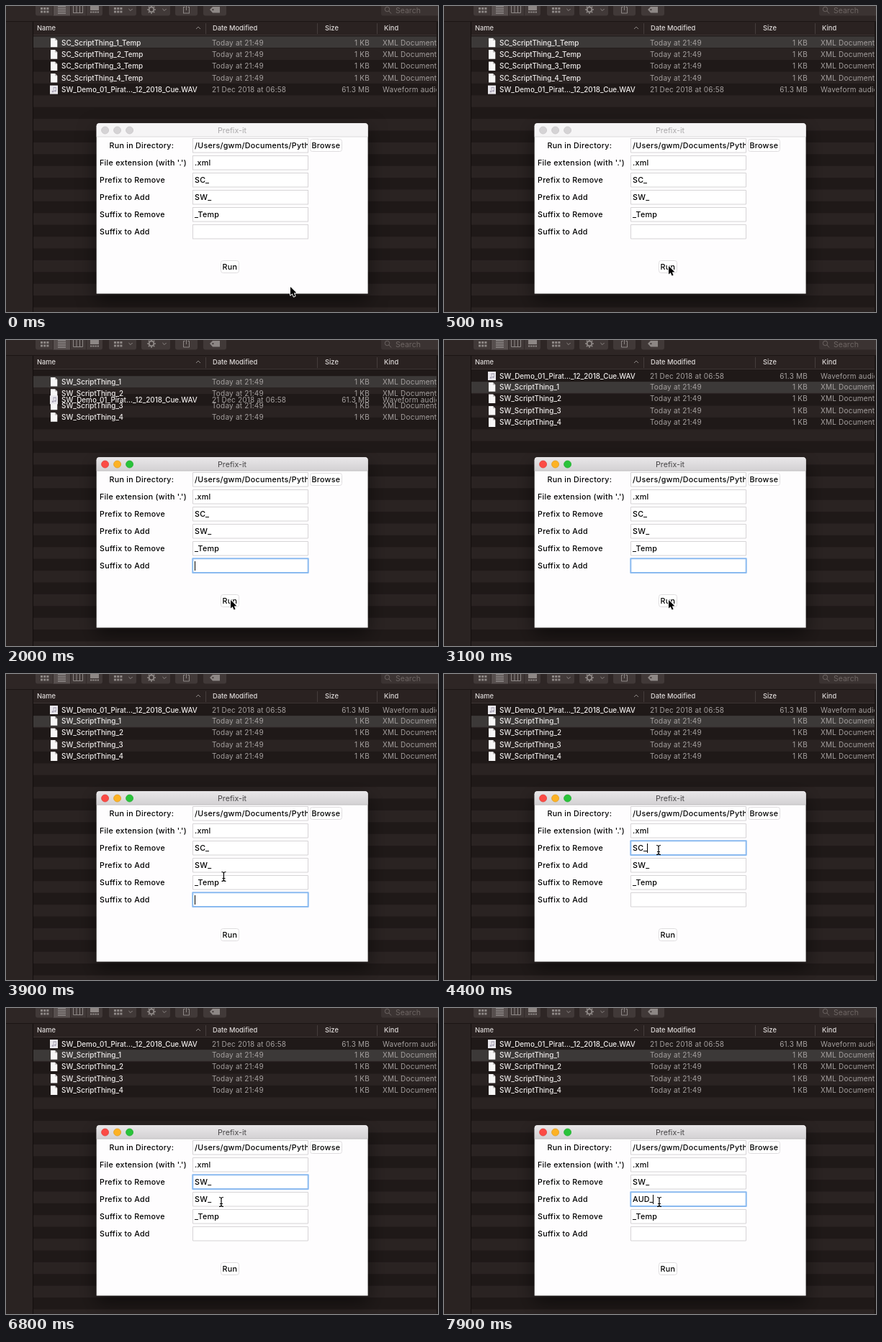
Animation, 600 px wide and 426 px high, one loop 8000 ms. Source, as an HTML page with a canvas:

```html
<!DOCTYPE html>
<html lang="en">
<head>
<meta charset="utf-8">
<title>Batch rename</title>
<style>
html, body { margin: 0; width: 100%; height: 100%; overflow: hidden; background: #1f1918; }
canvas { display: block; width: 600px; height: 426px; }
</style>
</head>
<body>
<canvas id="stage" width="600" height="426"></canvas>
<script>
const ctx = document.getElementById('stage').getContext('2d');
const LOOP = 8000, STEP = 100, ROW = 16.4, LIST_TOP = 42.3;
const FONT = 'Inter, Roboto, sans-serif';

const ease = p => p * p * (3 - 2 * p);
const ramp = (t, a, b) => ease(Math.min(1, Math.max(0, (t - a) / (b - a))));
const mix = (a, b, p) => a + (b - a) * p;
// value of the last [time, value] pair already reached
const at = (t, list) => list.reduce((v, [s, next]) => t >= s ? next : v, list[0][1]);

function rect(x, y, w, h, color) {
  ctx.fillStyle = color;
  ctx.fillRect(x, y, w, h);
}

function round(x, y, w, h, r, fill, stroke) {
  ctx.beginPath();
  ctx.roundRect(x, y, w, h, r);
  if (fill) { ctx.fillStyle = fill; ctx.fill(); }
  if (stroke) { ctx.strokeStyle = stroke; ctx.lineWidth = 1; ctx.stroke(); }
}

function shape(points, color) {
  ctx.beginPath();
  points.forEach(([x, y]) => ctx.lineTo(x, y));
  ctx.closePath();
  ctx.fillStyle = color;
  ctx.fill();
}

function disc(x, y, r, fill, stroke) {
  ctx.beginPath();
  ctx.arc(x, y, r, 0, Math.PI * 2);
  if (fill) { ctx.fillStyle = fill; ctx.fill(); }
  if (stroke) { ctx.strokeStyle = stroke; ctx.stroke(); }
}

function text(str, x, y, color, { size = 10, weight = 400, gap = 0, align = 'left' } = {}) {
  ctx.font = `${weight} ${size}px ${FONT}`;
  ctx.letterSpacing = gap + 'px';
  ctx.textAlign = align;
  ctx.fillStyle = color;
  ctx.fillText(str, x, y);
  return ctx.measureText(str).width;
}

function chevron(x, y, s, color, up) {
  ctx.beginPath();
  ctx.moveTo(x - s, y + (up ? s : 0));
  ctx.lineTo(x, y + (up ? 0 : s));
  ctx.lineTo(x + s, y + (up ? s : 0));
  ctx.strokeStyle = color;
  ctx.lineWidth = 1;
  ctx.stroke();
}

// ---- file browser ----
function toolbar() {
  rect(0, 0, 600, 22, '#2e2625');
  const button = '#413938', icon = '#8d8785';
  [[41, 93], [143, 38], [188, 40], [235, 31], [274, 32]]
    .forEach(([x, w]) => round(x, -6, w, 19.5, 3, button));
  rect(65, 0, 24, 13.5, '#574f4e');
  [65, 89, 111].forEach(x => rect(x, 0, 1, 13.5, '#322a29'));

  for (let i = 0; i < 3; i++) {
    for (let j = 0; j < 2; j++) {
      rect(48 + i * 4.2, 2 + j * 4.5, 3, 3, icon);
      rect(150 + i * 4.2, 2 + j * 4.5, 3, 3, icon);
    }
  }
  for (let i = 0; i < 4; i++) rect(72, i * 3 + 0.5, 11, 1, '#aaa5a3');
  ctx.strokeStyle = icon;
  ctx.lineWidth = 1;
  ctx.strokeRect(93.5, -1.5, 13, 11);
  rect(97.5, -1, 1, 10, icon);
  rect(102, -1, 1, 10, icon);
  rect(117, 0, 12, 6, icon);
  for (let i = 0; i < 4; i++) rect(117 + i * 3.2, 7.5, 2.4, 2, icon);
  chevron(173, 4, 2.6, icon);

  ctx.lineWidth = 2;
  disc(202, 5, 3.4, null, icon);
  for (let i = 0; i < 8; i++) {
    const a = i * Math.PI / 4;
    rect(201.2 + Math.cos(a) * 5, 4.2 + Math.sin(a) * 5, 1.7, 1.7, icon);
  }
  chevron(220, 4, 2.6, icon);

  ctx.lineWidth = 1;
  ctx.strokeStyle = icon;
  ctx.strokeRect(246.5, 1.5, 8, 8.5);
  rect(248.5, 0, 4, 3, button);
  rect(250, -2, 1, 8, icon);
  shape([[283, 5], [287, 1], [297, 1], [297, 9.5], [287, 9.5]], icon);
  disc(287.4, 5.2, 1.1, button);

  round(521, -6, 90, 19.5, 3, '#3b3332');
  const faint = '#6d6563';
  disc(529.5, 4.5, 3.2, null, faint);
  ctx.beginPath();
  ctx.moveTo(532, 7);
  ctx.lineTo(535, 10.5);
  ctx.stroke();
  text('Search', 541, 9.5, faint, { size: 10.5 });
}

function header() {
  rect(38, 22, 562, 19, '#2a2221');
  rect(0, 21, 600, 1, '#1b1514');
  rect(38, 40, 562, 1, '#3c3433');
  [277, 432, 515].forEach(x => rect(x, 24, 1, 15, '#453d3c'));
  [['Name', 43], ['Date Modified', 287], ['Size', 443], ['Kind', 525]]
    .forEach(([s, x]) => text(s, x, 34.3, '#dedad9', { size: 9.3, weight: 500 }));
  chevron(267, 29, 3, '#8d8785', true);
}

function pageIcon(x, y, audio) {
  if (audio) {
    const note = '#a7a2b4';
    rect(x - 1, y - 6, 11, 12, '#e9e7ec');
    disc(x + 3, y + 2.5, 1.3, note);
    disc(x + 6.4, y + 1.7, 1.3, note);
    rect(x + 3.6, y - 3, 0.8, 5.5, note);
    rect(x + 7, y - 3.6, 0.8, 5.5, note);
    rect(x + 3.6, y - 3.6, 4, 1.2, note);
    return;
  }
  shape([[x, y - 6.3], [x + 6, y - 6.3], [x + 9.3, y - 3], [x + 9.3, y + 6.3], [x, y + 6.3]], '#f7f6f6');
  shape([[x + 6, y - 6.3], [x + 9.3, y - 3], [x + 6, y - 3]], '#bcb8b7');
}

function fileRow(y, name, date, size, kind, audio) {
  const dim = '#a5a09f', gap = 0.2;
  pageIcon(62, y, audio);
  text(name, 77, y + 3.6, '#efeceb', { size: 9.9, weight: 500 });
  text(date, 286, y + 3.6, dim, { gap });
  text(size, 505, y + 3.6, dim, { gap, align: 'right' });
  text(kind, 523, y + 3.6, dim, { gap });
}

function browser(t) {
  const renamed = t >= 1800, p = ramp(t, 1800, 2200);
  const mid = i => 51 + ROW * i;

  rect(0, 0, 600, 426, '#1f1918');
  for (let i = 1; i < 25; i += 2) rect(38, LIST_TOP + i * ROW, 562, ROW, '#2a2322');
  rect(38, LIST_TOP + p * (ROW - 0.6), 562, ROW - 0.6, '#3c3938');
  for (let n = 1; n <= 4; n++) {
    fileRow(mid(n - 1 + p) - 2 * p, renamed ? `SW_ScriptThing_${n}` : `SC_ScriptThing_${n}_Temp`,
      'Today at 21:49', '1 KB', 'XML Document');
  }
  fileRow(mid(4 - 4 * p) - p, 'SW_Demo_01_Pirat…_12_2018_Cue.WAV',
    '21 Dec 2018 at 06:58', '61.3 MB', 'Waveform audio', true);

  toolbar();
  rect(0, 22, 37, 404, '#2a2322');
  rect(37, 22, 1, 404, '#130e0d');
  header();
  rect(598, 22, 2, 404, '#1a1514');
}

// ---- dialog ----
const UI = { size: 10.7, gap: 0.28, weight: 500 };
const BOX = { x: 125.7, y: 163.3, w: 376.9, h: 237.1 };
const LABELS = ['Run in Directory:', "File extension (with '.')", 'Prefix to Remove',
  'Prefix to Add', 'Suffix to Remove', 'Suffix to Add'];

const focusAt = t => at(t, [[0, -1], [1600, 5], [4300, 2], [6900, 3]]);
const caretAt = t => at(t, [[0, 0], [1600, 1], [2200, 0], [2500, 1], [3100, 0], [3400, 1],
  [4800, 0], [5100, 1], [6600, 0], [6900, 1]]);
const removeAt = t => at(t, [[0, 'SC_'], [5300, 'SC'], [5500, 'S'], [5700, 'SW'], [6000, 'SW_']]);
const addAt = t => at(t, [[0, 'SW_'], [7400, 'SW'], [7500, 'S'], [7600, ''],
  [7700, 'AU'], [7800, 'AUD'], [7900, 'AUD_']]);

function entry(i, value, focused, caret) {
  const y = 184 + i * 24;
  rect(259, y, 160, 20, '#fff');
  ctx.lineWidth = 1;
  ctx.strokeStyle = '#d6d4d6';
  ctx.strokeRect(259.5, y + 0.5, 160, 19.5);
  if (focused) {
    ctx.lineWidth = 2;
    ctx.strokeStyle = '#8abaf0';
    ctx.strokeRect(259.3, y + 0.3, 160.4, 19.7);
  }
  ctx.save();
  ctx.beginPath();
  ctx.rect(260, y, 159, 20);
  ctx.clip();
  const w = text(value, 262, y + 14.3, '#000', UI);
  ctx.restore();
  if (focused && caret) rect(Math.round(262 + w - 0.2), y + 4, 1, 13, '#000');
}

function pushButton(label, x, y, w, h) {
  round(x + 0.5, y + 0.5, w, h, 3, '#fff', '#dfdddf');
  text(label, x + w / 2 + 0.4, y + h / 2 + 4, '#000', { ...UI, align: 'center' });
}

function dialog(t) {
  const active = t >= 1600, { x, y, w, h } = BOX, corners = [4, 4, 0, 0];
  ctx.save();
  ctx.shadowColor = 'rgba(0,0,0,0.55)';
  ctx.shadowBlur = 26;
  ctx.shadowOffsetY = 9;
  round(x, y, w, h, corners, '#fefdfe');
  ctx.restore();

  const g = ctx.createLinearGradient(0, 163, 0, 182);
  g.addColorStop(0, active ? '#e9e7e9' : '#f6f5f6');
  g.addColorStop(1, active ? '#d3d1d3' : '#f6f5f6');
  round(x, y, w, 18.5, corners, g);
  rect(x, 181.5, w, 1, active ? '#b9b7b9' : '#dbd9db');
  const lights = active ? ['#fc4b45', '#fdb224', '#29c33a'] : Array(3).fill('#d5d3d5');
  const rims = active ? ['#dd3a36', '#dd9a1b', '#1eaa2c'] : Array(3).fill('#c4c2c4');
  ctx.lineWidth = 0.7;
  lights.forEach((c, i) => disc(137.6 + i * 17, 173, 5, c, rims[i]));
  text('Prefix-it', 314, 177, active ? '#454345' : '#aaa8aa', { size: 10.7, align: 'center' });

  LABELS.forEach((s, i) => text(s, i ? 130 : 143.5, 197.6 + i * 24, '#000', UI));
  const values = ['/Users/gwm/Documents/Python', '.xml', removeAt(t), addAt(t), '_Temp', ''];
  const focus = focusAt(t), caret = caretAt(t);
  values.forEach((v, i) => entry(i, v, i === focus, caret));
  pushButton('Browse', 422, 185, 44, 17);
  pushButton('Run', 298, 354, 25, 17);
}

// ---- pointer ----
function pointerAt(t) {
  const a = ramp(t, 0, 500), b = ramp(t, 3400, 4200), c = ramp(t, 6100, 6600);
  return [mix(395, 312, a) - 14 * b + c, mix(391, 362, a) - 117 * b + 25 * c];
}

function arrow(x, y) {
  const pts = [[0, 0], [0, 11.6], [2.7, 9.2], [4.6, 13.6], [6.6, 12.7], [4.8, 8.4], [8.3, 8.2]]
    .map(([dx, dy]) => [x + dx, y + dy]);
  ctx.lineJoin = 'round';
  ctx.lineWidth = 1.8;
  ctx.strokeStyle = '#fff';
  shape(pts, '#000');
  ctx.stroke();
  shape(pts, '#000');
}

function beam(x, y) {
  ctx.beginPath();
  for (const side of [-3, 3]) {
    ctx.moveTo(x + side, y - 6.5);
    ctx.quadraticCurveTo(x, y - 6.5, x, y - 4.5);
    ctx.lineTo(x, y + 4.5);
    ctx.quadraticCurveTo(x, y + 6.5, x + side, y + 6.5);
  }
  ctx.moveTo(x - 2, y + 2.5);
  ctx.lineTo(x + 2, y + 2.5);
  ctx.strokeStyle = '#000';
  ctx.lineWidth = 1.2;
  ctx.stroke();
}

function pointer(t) {
  const [x, y] = pointerAt(t);
  const overEntry = y >= 184 && y < 324 && (y - 184) % 24 < 20;
  (overEntry ? beam : arrow)(x, y);
}

function frame(now) {
  const t = Math.floor((now % LOOP) / STEP) * STEP;
  browser(t);
  dialog(t);
  pointer(t);
  requestAnimationFrame(frame);
}
requestAnimationFrame(frame);
</script>
</body>
</html>
```
